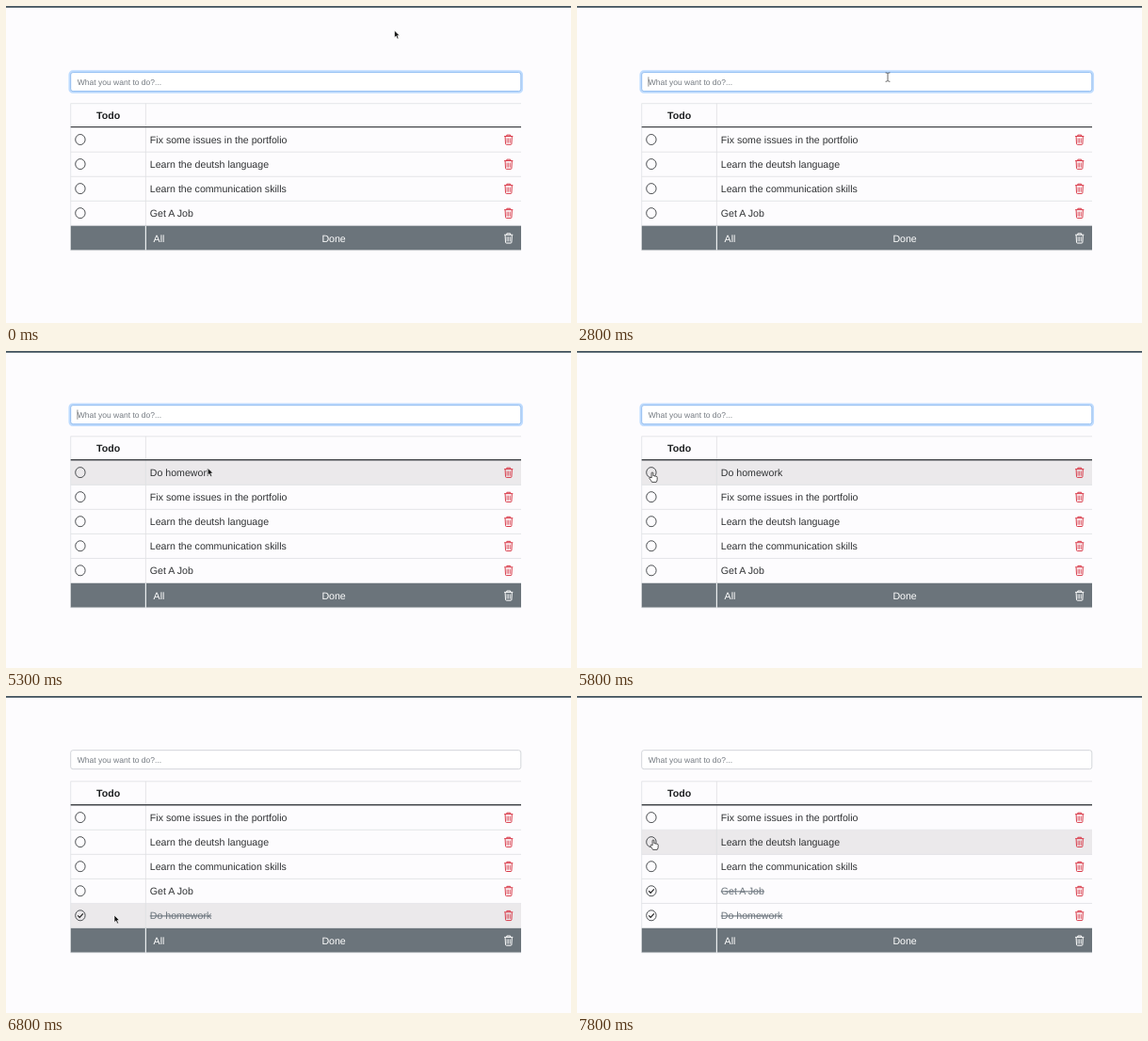
Animation, 600 px wide and 337 px high, one loop 8000 ms. Source, as an HTML page:

```html
<!DOCTYPE html>
<html lang="en">
<head>
<meta charset="utf-8">
<title>Todo list</title>
<style>
  html, body { margin: 0; width: 100%; height: 100%; overflow: hidden; background: #fdfcfe; }
  svg { display: block; width: 100vw; height: 100vh; }
  text {
    font: 10.62px "Liberation Sans", Arial, sans-serif;
    fill: #303234;
    text-rendering: geometricPrecision;
    white-space: pre;
  }
  .small { font-size: 8.52px; }
  .hint { fill: #757b82; }
  .done { fill: #6c757d; text-decoration: line-through; }
  .light { fill: #fff; }
  .head { font-weight: bold; text-anchor: middle; fill: #1d1f21; }
</style>
</head>
<body>
<svg id="stage" viewBox="0 0 600 337">
  <defs>
    <g id="trash" fill="none" stroke="currentColor">
      <path d="M-4.6-3.8H4.6M-1.9-4V-5.2H1.9V-4" stroke-width="1"/>
      <path d="M-3.6-3.4L-3.2 4.2Q-3.1 5-2.3 5H2.3Q3.1 5 3.2 4.2L3.6-3.4" stroke-width="1"/>
      <path d="M-1.6-1.8V3.3M0-1.8V3.3M1.6-1.8V3.3" stroke-width=".75"/>
    </g>
    <path id="arrow" d="M0 0V7.6L1.8 6L3.1 9L4.5 8.4L3.2 5.5H5.5Z"
      fill="#151515" stroke="#fff" stroke-width=".6"/>
    <path id="ibeam" d="M-2.4-4.6Q0-4.6 0-3.6Q0-4.6 2.4-4.6M0-3.6V3.8M-2.4 4.8Q0 4.8 0 3.8Q0 4.8 2.4 4.8"
      fill="none" stroke="#555" stroke-width=".9"/>
    <path id="hand" d="M-.9 6V.8Q-.9 0 0 0T.9.8V3.8Q1.8 3.2 2.4 4Q3.2 3.5 3.8 4.4Q5.2 4 5.2 5.4V7.4Q5.2 9 4.2 10.4H-.4Q-1.2 8.8-3 6.6Q-3.3 5.4-2.2 5.3Q-1.5 5.4-.9 6Z"
      fill="#fff" stroke="#333" stroke-width=".85"/>
  </defs>
  <g id="scene"></g>
</svg>
<script>
const LOOP = 8000, STEP = 100;
const LEFT = 68.7, RIGHT = 547, SPLIT = 148.4, ROW = 26.05;
const SUBMIT = 4900, CHECK_NEW = 5900, CHECK_JOB = 7300;
const NEW_ITEM = 'Do homework';
const ITEMS = ['Fix some issues in the portfolio', 'Learn the deutsh language',
  'Learn the communication skills', 'Get A Job'];

// focus changes: time, focused
const FOCUS = [[-1000, 1], [300, 0], [1400, 1], [CHECK_NEW, 0]];
// keystrokes: the n-th letter appears at the n-th time
const KEYS = [3000, 3200, 3500, 3600, 3700, 3800, 3900, 4100, 4200, 4300, 4400];
// pointer: time, x, y
const POINTER = [
  [0, 412.5, 26], [200, 411, 21], [600, 409, 21], [900, 383, 42], [1300, 330, 75.5],
  [5000, 330, 75.5], [5300, 214.3, 124.5], [5700, 80, 129], [6400, 80, 129],
  [6600, 85.3, 143], [6800, 115, 233], [7100, 80, 206], [7400, 80, 206],
  [7800, 81, 153], [LOOP, 81, 153]
];

const scene = document.getElementById('scene');
const measure = document.createElement('canvas').getContext('2d');
measure.font = '85.2px "Liberation Sans", Arial, sans-serif';
const textWidth = s => measure.measureText(s).width / 10;

const text = (x, y, s, cls = '') => `<text x="${x}" y="${y}" class="${cls}">${s}</text>`;
const rect = (x, y, w, h, fill, more = '') =>
  `<rect x="${x}" y="${y}" width="${w}" height="${h}" fill="${fill}" ${more}/>`;
const line = (x1, y1, x2, y2, color, width = .8) =>
  `<path d="M${x1} ${y1}L${x2} ${y2}" stroke="${color}" stroke-width="${width}"/>`;
const icon = (id, x, y, color = '#000') =>
  `<use href="#${id}" x="${x}" y="${y}" color="${color}"/>`;

function pointerAt(t) {
  const i = POINTER.findIndex((p, n) => n && t <= p[0]);
  const [t0, x0, y0] = POINTER[i - 1], [t1, x1, y1] = POINTER[i];
  const k = (t - t0) / (t1 - t0);
  return { x: x0 + (x1 - x0) * k, y: y0 + (y1 - y0) * k };
}

function itemsAt(t) {
  const list = ITEMS.map(name => ({ name, done: name === 'Get A Job' && t >= CHECK_JOB }));
  const added = { name: NEW_ITEM, done: t >= CHECK_NEW };
  if (t >= SUBMIT) added.done ? list.push(added) : list.unshift(added);
  return list;
}

function drawInput(t, top) {
  const [since, on] = FOCUS.filter(f => f[0] <= t).pop();
  const fade = Math.min(1, (t - since + 50) / 150);
  const glow = on ? fade : 1 - fade;
  const typed = t < SUBMIT ? NEW_ITEM.slice(0, KEYS.filter(k => k <= t).length) : '';
  const box = color => rect(LEFT, top, RIGHT - LEFT - .2, 20, '#fff', `rx="2.4" stroke="${color}" stroke-width=".9"`);
  let out = rect(LEFT - 1.2, top - 1.2, RIGHT - LEFT + 2.2, 22.4, 'none',
    `rx="3.4" stroke="#bfdcff" stroke-width="2.1" opacity="${glow}"`);
  out += box('#cfd2d6') + `<g opacity="${glow}">${box('#86b9f5')}</g>`;
  out += text(75.7, top + 12.9, typed || 'What you want to do?...', typed ? 'small' : 'small hint');

  const lastAction = Math.max(since, ...[...KEYS, SUBMIT].filter(k => k <= t));
  if (on && t >= FOCUS[2][0] && Math.floor((t - lastAction) / 500) % 2 === 0) {
    const x = 75.9 + textWidth(typed);
    out += line(x, top + 4.8, x, top + 15, '#444', .6);
  }
  return out;
}

function drawRow(item, y, hovered) {
  let out = '';
  if (hovered) out += rect(LEFT, y - 12.7, RIGHT - LEFT, ROW, '#ebe9eb');
  out += line(LEFT, y + 13.2, RIGHT, y + 13.2, '#dfe0e4');
  out += `<ellipse cx="78.9" cy="${y}" rx="5.2" ry="5.5" fill="none" stroke="#44474a" stroke-width=".95"/>`;
  if (item.done) out += `<path d="M76.2 ${y}l2 2.1 3.6-4" fill="none" stroke="#222" stroke-width="1.2"/>`;
  return out + text(152.8, y + 3.6, item.name, item.done ? 'done' : '') + icon('trash', 533.7, y + .3, '#d93a49');
}

function draw(t) {
  const items = itemsAt(t), p = pointerAt(t);
  const shift = t >= SUBMIT ? -12.9 : 0;
  const inputTop = 70.6 + shift, headTop = 103.7 + shift, first = 142 + shift;
  const rowY = i => first + i * ROW;
  const footTop = rowY(items.length - 1) + 13.6;
  const hover = Math.floor((p.y - 1.5 - first + 13) / ROW);

  let out = rect(0, 0, 600, 1.8, '#43545e') + drawInput(t, inputTop);
  out += line(LEFT, headTop, RIGHT, headTop, '#dfe0e4');
  out += text(108.6, headTop + 16.3, 'Todo', 'head');
  out += items.map((item, i) => drawRow(item, rowY(i), i === hover)).join('');
  out += line(LEFT, headTop, LEFT, footTop, '#dfe0e4') + line(SPLIT, headTop, SPLIT, footTop, '#dfe0e4');
  out += line(LEFT, headTop + 24.9, RIGHT, headTop + 24.9, '#43464a', 1.4);

  out += rect(LEFT, footTop, RIGHT - LEFT, 26, '#6b747b');
  out += line(SPLIT, footTop, SPLIT, footTop + 26, '#eceef0', 1.2);
  out += line(LEFT, footTop + 26, RIGHT, footTop + 26, '#dfe0e4');
  out += text(156.6, footTop + 16.8, 'All', 'light') + text(335.4, footTop + 16.8, 'Done', 'light');
  out += icon('trash', 533.7, footTop + 13.3, '#fff');

  const overInput = p.y > inputTop && p.y < inputTop + 20;
  const overCheck = items.some((_, i) => Math.hypot(p.x - 79, p.y - rowY(i)) < 6);
  scene.innerHTML = out + icon(overInput ? 'ibeam' : overCheck ? 'hand' : 'arrow', p.x, p.y);
}

const start = performance.now();
let shown = -1;
function tick() {
  const t = Math.floor(((performance.now() - start) % LOOP) / STEP) * STEP;
  if (t !== shown) draw(shown = t);
  requestAnimationFrame(tick);
}
tick();
</script>
</body>
</html>
```
